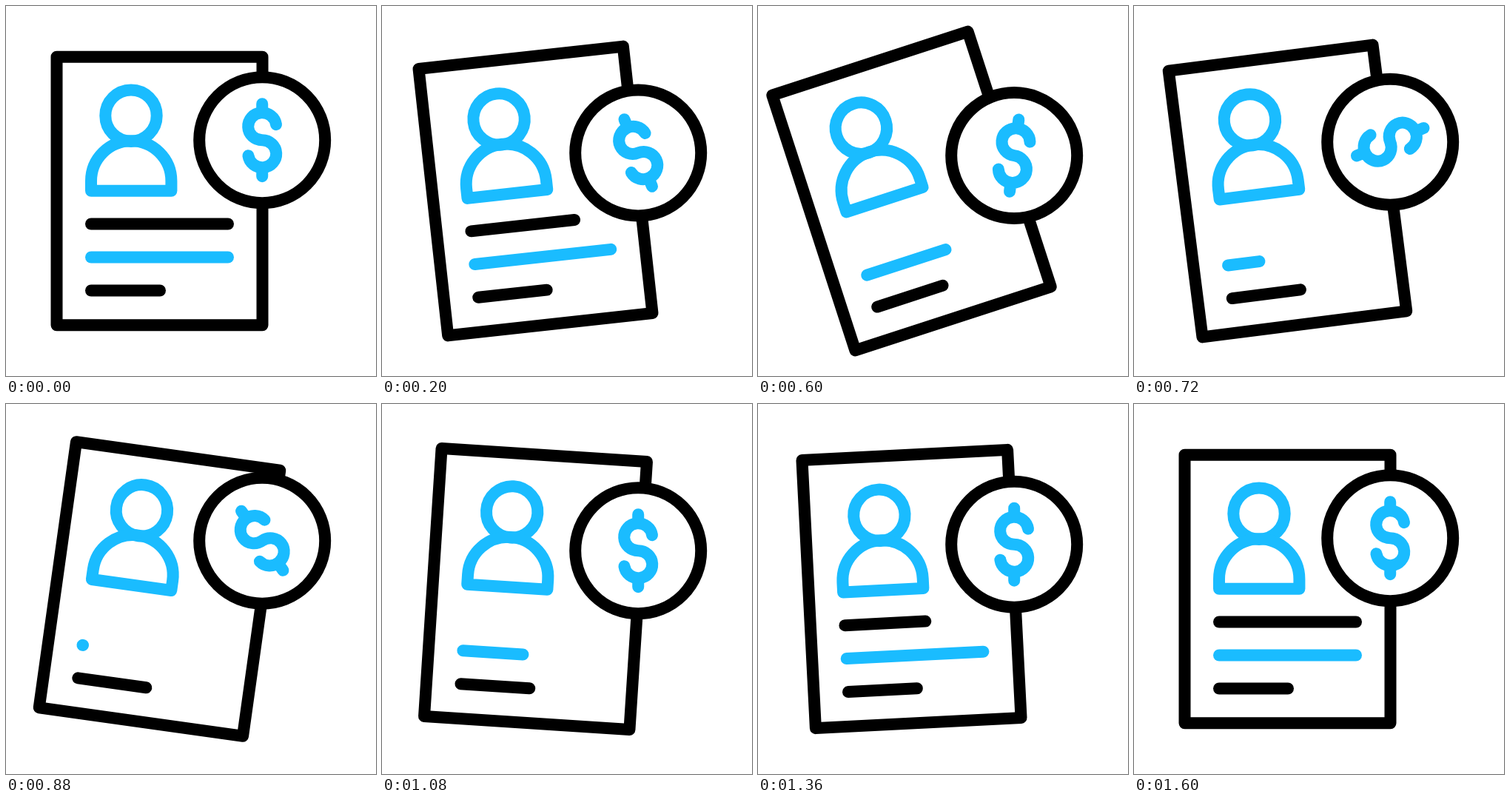
Animation of 500 by 500 pixels, one loop 2 s. Source, as an HTML page:

```html
<!DOCTYPE html>
<html lang="en">
<head>
<meta charset="utf-8">
<title>Paid profile</title>
<style>
  html, body { margin: 0; width: 100%; height: 100%; overflow: hidden; background: #fff; }
  svg { display: block; width: 100vw; height: 100vh; }
  g { fill: none; stroke: #000; stroke-width: 16; stroke-linecap: round; stroke-linejoin: round; }
  .blue { stroke: #1abcff; }
</style>
</head>
<body>
<svg viewBox="0 0 500 500">
  <g id="page">
    <rect x="68.5" y="68.7" width="278" height="362.6"/>
    <g class="blue">
      <circle cx="169" cy="148.2" r="34.7"/>
      <path d="M115 249.8V236.4a54.2 54.2 0 0 1 108.4 0V249.8Z"/>
    </g>
    <path id="upperLine"/>
    <path id="middleLine" class="blue"/>
    <path d="M115 384.5h93"/>
  </g>
  <g id="coin">
    <circle r="85" fill="#fff"/>
    <path id="dollar" class="blue" d="M18.8 -21A19 18.5 0 1 0 0 0A19 18.5 0 1 1 -18.8 21M0 -49V-37M0 37V49"/>
  </g>
</svg>
<script>
  const LOOP = 2000, STEP = 40, LINE_LENGTH = 185;
  const el = id => document.getElementById(id);
  const move = (id, transform) => el(id).setAttribute("transform", transform);

  function drawLine(id, y, part) {
    el(id).setAttribute("d", part > 0 ? `M115 ${y}h${LINE_LENGTH * part}` : "");
  }

  function draw(now) {
    const t = Math.floor((now % LOOP) / STEP) * STEP;

    // Smooth rise from 0 to 1 between two times.
    const rise = (from, to) => {
      const s = Math.min(1, Math.max(0, (t - from) / (to - from)));
      return s * s * (3 - 2 * s);
    };

    // The page swings to -20, 10 and -5 degrees before it rests.
    const tilt = -20 * rise(0, 536) + 30 * rise(536, 945) - 15 * rise(945, 1248) + 5 * rise(1248, 1500);
    // The coin drops twice, the second time half as far.
    const drop = 40 * (rise(0, 440) - rise(440, 770)) + 20 * (rise(770, 1180) - rise(1180, 1507));
    // The dollar sign winds up, then makes a half turn.
    const spin = -45 * rise(0, 400) + 225 * rise(400, 1040);

    move("page", `rotate(${tilt} 207.5 250)`);
    move("coin", `translate(346.2 ${181.2 + drop})`);
    move("dollar", `rotate(${spin})`);
    drawLine("upperLine", 294.5, 1 - rise(52, 516) + rise(1080, 1580));
    drawLine("middleLine", 339.5, 1 - rise(400, 865) + rise(865, 1333));
  }

  const start = performance.now();
  function tick() {
    draw(performance.now() - start);
    requestAnimationFrame(tick);
  }
  tick();
</script>
</body>
</html>
```
